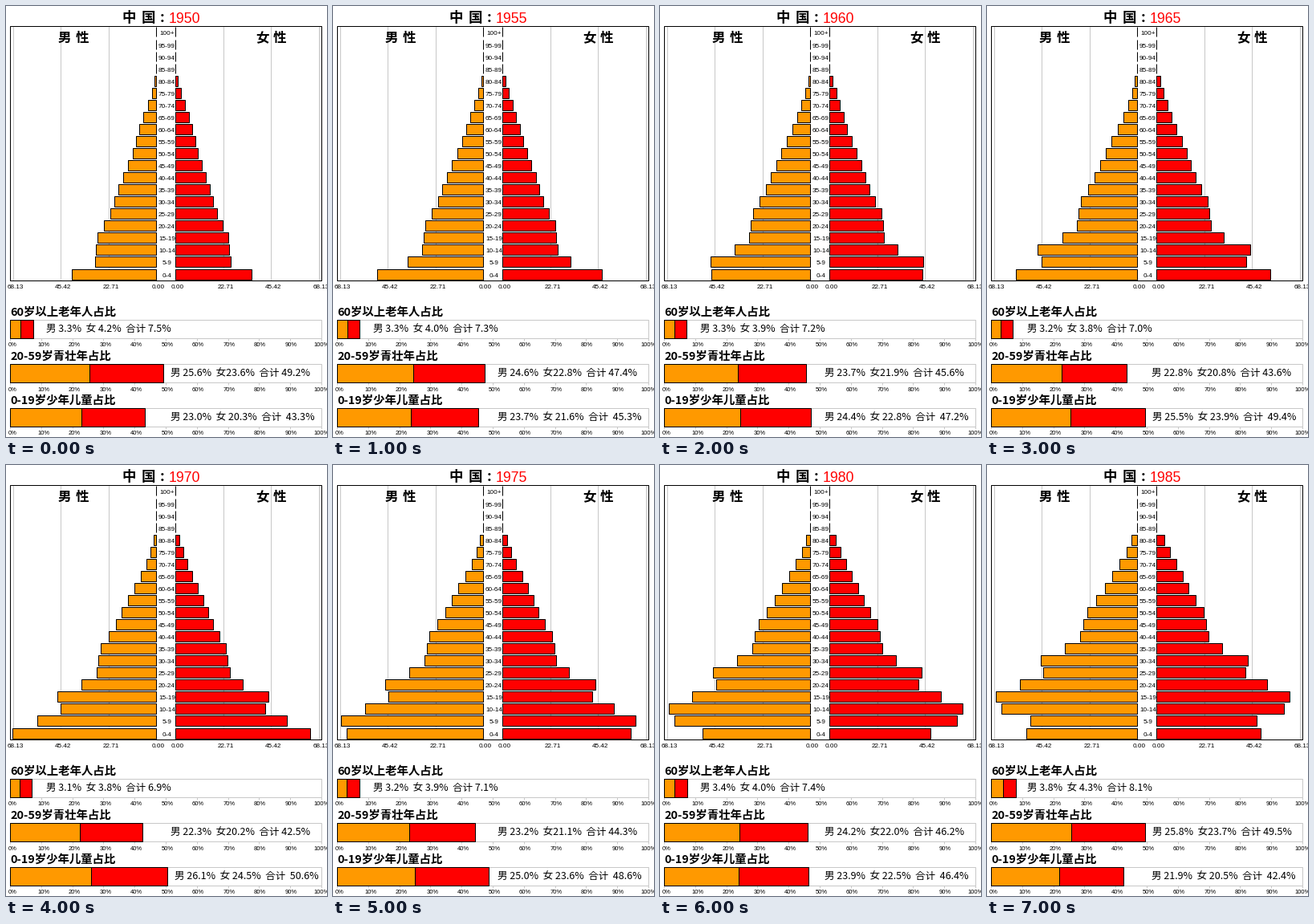
A matplotlib script for the animation above (8000 ms loop, 400 by 537 pixels).

```python
import math

import matplotlib.pyplot as plt
import numpy as np
from matplotlib.animation import FuncAnimation
from matplotlib.patches import Rectangle

W, H, DPI = 400, 537, 100
ORANGE, RED, GREY = "#ff9900", "#ff0000", "#c8c8c8"
CJK, SANS = "Noto Sans CJK JP", "Liberation Sans"
MEN_X, WOMEN_X = 187.5, 211.5
BAR_X, BAR_W, BAR_H = 5.5, 388, 23
FIRST, STEP, COUNT = 1950, 5, 8
GROUPS = 17  # the last one takes in everybody over 80

# Size of a male birth cohort, in pixels of bar, at a few birth years.
BORN = [1870, 1885, 1900, 1925, 1930, 1935, 1945,
        1950, 1955, 1960, 1965, 1970, 1975, 1980, 1985]
SIZE = [16, 30, 36, 59, 66, 74, 77, 95, 125, 120, 149, 178, 170, 134, 138]

# Printed shares in percent; the youngest women make up the remainder.
KEY_YEARS = [1950, 1960, 1965, 1970, 1980, 1985]
SENIOR_MEN = [3.3, 3.3, 3.2, 3.1, 3.4, 3.8]
SENIOR_WOMEN = [4.2, 3.9, 3.8, 3.8, 4.0, 4.3]
ADULT_MEN = [25.6, 23.7, 22.8, 22.3, 24.2, 25.8]
ADULT_WOMEN = [23.6, 21.9, 20.8, 20.2, 22.0, 23.7]
YOUNG_MEN = [23.0, 24.4, 25.5, 26.1, 23.9, 21.9]


def length(year, row, female):
    """Bar length: cohort size times Gompertz survival to this age."""
    born = year - STEP * row
    size = np.interp(born, BORN, SIZE)
    if female:
        size *= 0.94 if born > 1950 else 0.9
    t = (year - FIRST) / STEP
    limit = 13.7 + 0.05 * (t - 3) ** 2 + 0.9 * female
    size *= math.exp(-math.exp(0.38 * (row - limit)))
    if row == 0:  # early deaths, fading out with time
        size *= 1 + 0.11 * math.exp(-t / 1.6)
    return round(size)


def shares(year):
    """(men, women) of seniors, adults and the young."""
    sm, sw, am, aw, ym = (
        round(float(np.interp(year, KEY_YEARS, s)), 1)
        for s in (SENIOR_MEN, SENIOR_WOMEN, ADULT_MEN, ADULT_WOMEN, YOUNG_MEN))
    return (sm, sw), (am, aw), (ym, 100 - sm - sw - am - aw - ym)


fig = plt.figure(figsize=(W / DPI, H / DPI), dpi=DPI, facecolor="white")
ax = fig.add_axes([0, 0, 1, 1])
ax.set_xlim(0, W)
ax.set_ylim(H, 0)
ax.axis("off")


def text(x, y, s, px, font=CJK, color="black", ha="left", weight="normal"):
    return ax.text(x, y, s, fontsize=px * 72 / DPI, family=font, color=color,
                   ha=ha, va="baseline", weight=weight)


def box(x, y, w, h, fill="none", edge="black", z=2):
    return ax.add_patch(Rectangle((x, y), w, h, facecolor=fill, edgecolor=edge,
                                  linewidth=72 / DPI, zorder=z, snap=False))


def vline(x, top, bottom, color):
    ax.plot([x, x], [top, bottom], color=color, lw=72 / DPI, zorder=1,
            solid_capstyle="butt", snap=False)


def draw_title():
    for x, s in ((144, "中"), (169, "国"), (192, ":")):
        text(x, 20.5, s, 17.5, weight="bold")
    for x, s in ((64.5, "男"), (86.5, "性"), (311, "女"), (333, "性")):
        text(x, 45, s, 16.5, weight="bold")
    return text(203, 21, "", 17.6, SANS, RED)


def draw_pyramid():
    box(5.5, 25.5, 388, 317)
    for zero, side in ((MEN_X, -1), (WOMEN_X, 1)):
        for k in range(4):
            x = math.floor(zero + side * 59.5 * k) + 0.5
            if k:
                vline(x, 26, 342, GREY)
            text(x + 2.5, 352, f"{22.71 * k:.2f}", 8.2, SANS, ha="center")
    men, women = [], []
    for row in range(21):
        y = 334 - 15.05 * row
        label = f"{5 * row}-{5 * row + 4}" if row < 20 else "100+"
        text(200.5, y + 3.5, label, 8.2, SANS, ha="center")
        top = round(y - 6.5) + 0.5
        if row < GROUPS:
            men.append(box(MEN_X, top, 0, 13, ORANGE))
            women.append(box(WOMEN_X, top, 0, 13, RED))
        else:
            for x in (MEN_X, WOMEN_X):
                vline(x, top, top + 12, "black")
    return men, women


def draw_band(top, heading):
    text(5, top - 6, heading, 14.4, weight="bold")
    box(BAR_X, top, BAR_W, BAR_H, edge=GREY, z=1)
    for k in range(11):
        vline(round(38.8 * k) + BAR_X, top + BAR_H, top + BAR_H + 3, GREY)
        text(8.5 + 38.5 * k, top + 33, f"{10 * k}%", 7.7, SANS, ha="center")
    bars = [box(BAR_X, top, 0, BAR_H, c) for c in (ORANGE, RED)]
    return bars, text(0, top + 15, "", 12.5)


year_text = draw_title()
men_bars, women_bars = draw_pyramid()
# Heading, caption pattern and the least x of the caption.
BANDS = (("60岁以上老年人占比", "男 {:.1f}%  女 {:.1f}%  合计 {:.1f}%", 50),
         ("20-59岁青壮年占比", "男 {:.1f}%  女{:.1f}%  合计 {:.1f}%", 205),
         ("0-19岁少年儿童占比", "男 {:.1f}%  女 {:.1f}%  合计  {:.1f}%", 205))
bands = [draw_band(391.5 + 55 * i, band[0]) for i, band in enumerate(BANDS)]


def update(i):
    year = FIRST + STEP * i
    year_text.set_text(str(year))
    for row, (man, woman) in enumerate(zip(men_bars, women_bars)):
        w = length(year, row, False)
        man.set_x(MEN_X - w)
        man.set_width(w)
        woman.set_width(length(year, row, True))
    for (bars, label), (_, pattern, x), (m, w) in zip(bands, BANDS, shares(year)):
        split, end = (round(BAR_W * s / 100) for s in (m, m + w))
        bars[0].set_width(split)
        bars[1].set_x(BAR_X + split)
        bars[1].set_width(end - split)
        label.set_text(pattern.format(m, w, m + w))
        label.set_x(max(x, BAR_X + end + 8))
    return []


anim = FuncAnimation(fig, update, frames=COUNT, interval=1000,
                     init_func=lambda: [], repeat=True, repeat_delay=0)
plt.show()
```
